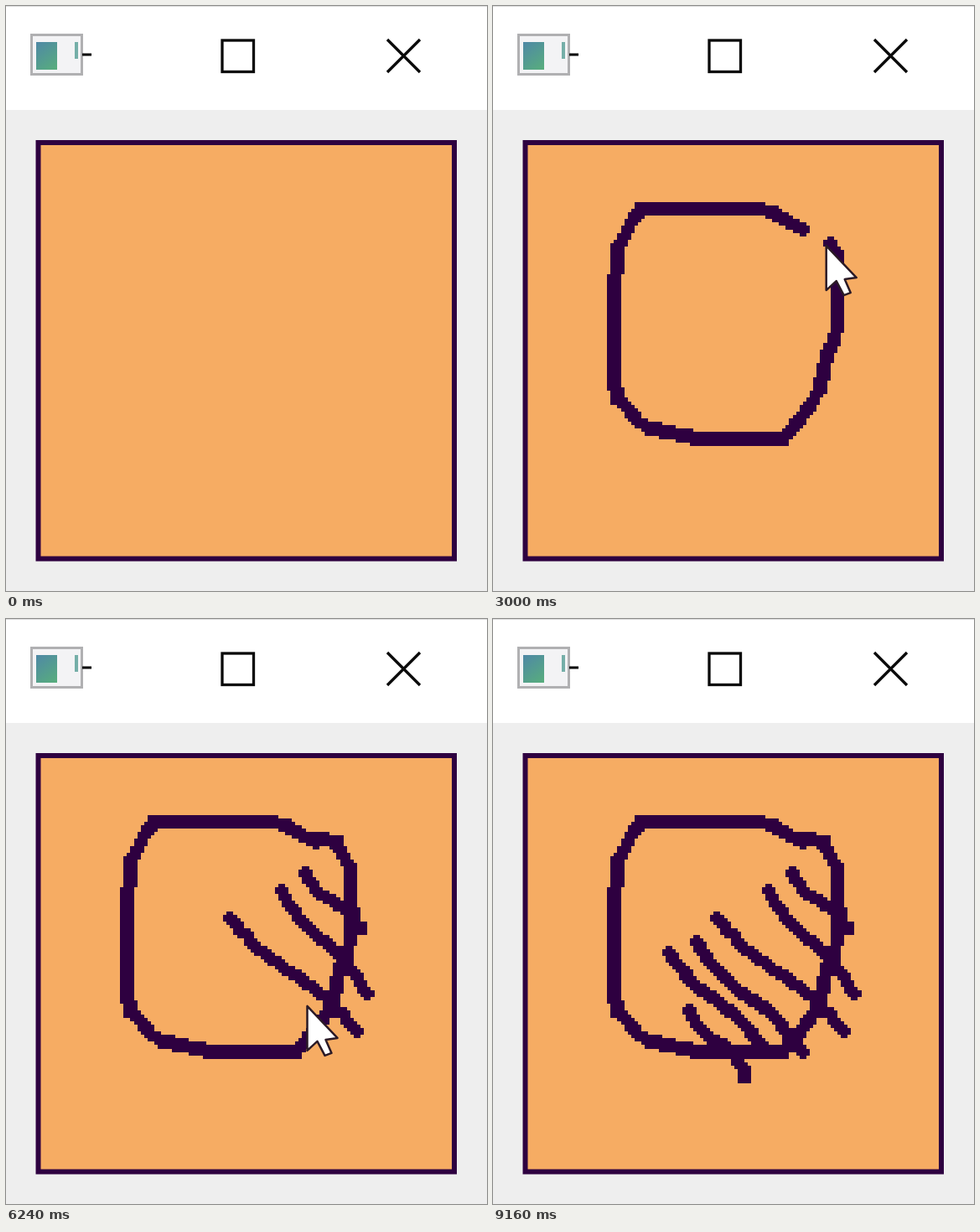
An HTML page with a canvas that plays this animation: 574 px wide and 698 px high, repeating every 9920 ms.

```html
<!DOCTYPE html>
<html lang="en">
<head>
<meta charset="utf-8">
<title>Drawing pad</title>
<style>
  html, body { margin: 0; width: 100%; height: 100%; overflow: hidden; background: #eee; }
  canvas { display: block; filter: blur(0.7px); }
</style>
</head>
<body>
<canvas id="stage" width="574" height="698"></canvas>
<script>
const ctx = document.getElementById('stage').getContext('2d');
const LOOP = 9920, TICK = 40;
const INK = '#2e0040';
const CELL = 4.1, LEFT = 41.8, TOP = 164; // the pad's magnified pixel grid
const HALF_PEN = 2, CAP = 1.6;            // in cells

const mix = (a, b, u) => a.map((v, i) => v + (b[i] - v) * u);
const gap = (a, b) => Math.hypot(b[0] - a[0], b[1] - a[1]);

// Constant speed along a line through corner points.
function polyline(...points) {
  const total = points.slice(1).reduce((sum, p, i) => sum + gap(points[i], p), 0);
  return u => {
    let rest = u * total, i = 1;
    while (i < points.length - 1 && rest > gap(points[i - 1], points[i])) {
      rest -= gap(points[i - 1], points[i++]);
    }
    return mix(points[i - 1], points[i], rest / gap(points[i - 1], points[i]));
  };
}

// A hatch line with a slight S-shaped sway.
function hatch(from, to) {
  const length = gap(from, to);
  const normal = [(to[1] - from[1]) / length, (from[0] - to[0]) / length];
  return u => mix(from, to, u).map((v, i) => v - normal[i] * 5 * Math.sin(2 * Math.PI * u));
}

const stroke = (start, end, at) => ({ start, end, at });
const rest = (time, point) => stroke(time, time, () => point);

const outline = polyline([369, 266], [328, 243], [176, 243], [150, 282], [144, 345],
  [144, 462], [172, 497], [240, 517], [346, 517], [388, 465], [404, 402],
  [412, 380], [412, 300], [388, 259], [366, 263]);

const timeline = [
  rest(480, [495, 702]),
  stroke(1160, 3105, outline),
  stroke(3500, 4000, hatch([359, 304], [422, 371])),
  stroke(4290, 4900, hatch([327, 323], [430, 446])),
  stroke(5300, 6120, hatch([268, 356], [417, 492])),
  stroke(6520, 7000, hatch([242, 385], [368, 516])),
  stroke(7250, 7720, hatch([209, 397], [319, 509])),
  stroke(8100, 8600, hatch([236, 467], [302, 546])),
  rest(9000, [500, 702]),
];

function penAt(t) {
  const i = timeline.findIndex(s => t <= s.end);
  if (i < 0) return timeline[timeline.length - 1].at(1);
  const next = timeline[i], last = timeline[i - 1];
  if (t >= next.start) return next.at((t - next.start) / (next.end - next.start || 1));
  if (!last) return next.at(0);
  return mix(last.at(1), next.at(0), (t - last.end) / (next.start - last.end));
}

function rect(color, x, y, w, h) {
  ctx.fillStyle = color;
  ctx.fillRect(x, y, w, h);
}

function trace(points) {
  ctx.beginPath();
  points.forEach(p => ctx.lineTo(...p));
}

function drawWindow() {
  rect('#eeeeee', 0, 0, 574, 698);
  rect('#ffffff', 0, 0, 574, 124);
  rect('#dedede', 0, 0, 574, 1);

  rect('#b0b0b2', 29, 33, 63, 50);
  rect('#f3f3f5', 32, 36, 57, 44);
  const glass = ctx.createLinearGradient(36, 43, 61, 76);
  glass.addColorStop(0, '#4f88a6');
  glass.addColorStop(1, '#58ae7c');
  rect(glass, 36, 43, 25, 33);
  rect('#75aea8', 82, 43, 4, 20);
  rect('#000000', 91, 56.5, 11, 3);

  ctx.strokeStyle = '#0a0a0a';
  ctx.lineWidth = 3.3;
  ctx.strokeRect(258, 41, 37.5, 37.5);
  for (const [a, b] of [[40, 79], [79, 40]]) {
    trace([[455, a], [494, b]]);
    ctx.stroke();
  }

  rect(INK, 35.5, 160, 502.5, 502.5);
  rect('#f6ac63', 41.5, 166, 490.5, 490.5);
}

// One square-capped, hard-edged line between two grid points.
function drawSegment(a, b) {
  const length = gap(a, b);
  const [dx, dy] = length ? [(b[0] - a[0]) / length, (b[1] - a[1]) / length] : [1, 0];
  const px = col => Math.round(LEFT + col * CELL);
  const py = row => Math.round(TOP + row * CELL);
  const range = i => [Math.min(a[i], b[i]) - 3, Math.max(a[i], b[i]) + 3];
  const [left, right] = range(0), [top, bottom] = range(1);
  for (let row = top; row < bottom; row++) {
    for (let col = left; col < right; col++) {
      const x = col + 0.5 - a[0], y = row + 0.5 - a[1];
      const along = x * dx + y * dy, across = Math.abs(y * dx - x * dy);
      if (across > HALF_PEN || along < -CAP || along > length + CAP) continue;
      ctx.fillRect(px(col), py(row), px(col + 1) - px(col), py(row + 1) - py(row));
    }
  }
}

// The pen is sampled once per tick and snapped to the grid.
function drawInk({ start, end, at }, t) {
  const sample = time => {
    const [x, y] = at((time - start) / (end - start));
    return [Math.round((x - LEFT) / CELL), Math.round((y - TOP) / CELL)];
  };
  ctx.fillStyle = INK;
  for (let time = start; time < Math.min(t, end); time += TICK) {
    drawSegment(sample(time), sample(Math.min(time + TICK, t, end)));
  }
}

function drawCursor([x, y]) {
  ctx.save();
  ctx.translate(x - 5, y + 2);
  trace([[0, 0], [0, 53], [12, 42], [21, 59], [29, 56], [22, 40], [36, 38]]);
  ctx.closePath();
  ctx.fillStyle = '#ffffff';
  ctx.fill();
  ctx.strokeStyle = '#2b1a26';
  ctx.lineWidth = 2.5;
  ctx.lineJoin = 'round';
  ctx.stroke();
  ctx.restore();
}

function draw(t) {
  drawWindow();
  timeline.forEach(s => drawInk(s, t));
  drawCursor(penAt(t));
}

function play() {
  const t = performance.now() % LOOP;
  draw(Math.floor(t / TICK) * TICK);
  requestAnimationFrame(play);
}
play();
</script>
</body>
</html>
```
